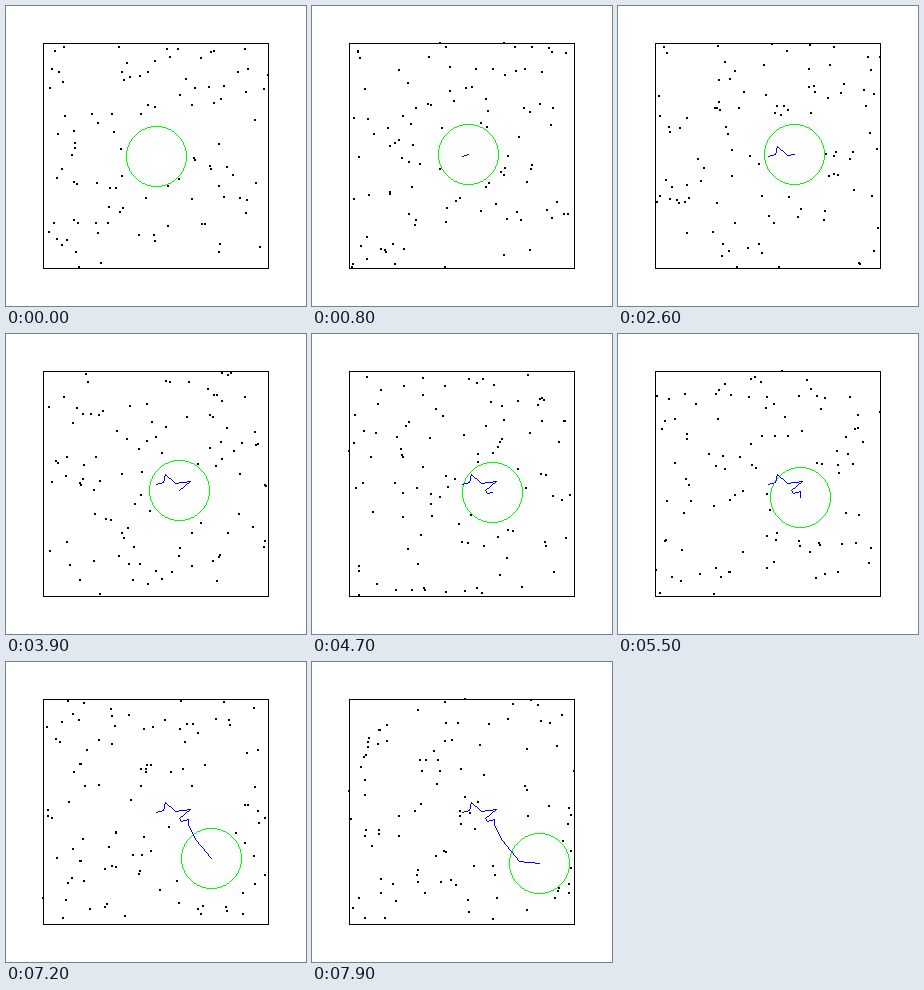
These frames come from a looping animation (300 px wide and 300 px high, 8000 ms). A matplotlib script:

```python
import numpy as np
import matplotlib.pyplot as plt
from matplotlib.animation import FuncAnimation

SIZE, FRAMES, STEP_MS = 300, 80, 100
LOW, HIGH = 37, 262
RADIUS, COUNT, SPEED, SUBSTEPS = 30, 100, 4.0, 4
BLACK, GREEN, BLUE, WHITE = (0, 0, 0), (0, 255, 0), (0, 0, 255), 255

# Turning points of the big disc's random walk: step, x, y
TURNS = np.array([
    (0, 150, 150), (9, 157, 148), (14, 159, 140), (22, 169, 149),
    (30, 184, 147), (39, 173, 156), (42, 175, 159), (49, 182, 157),
    (55, 182, 163), (65, 190, 178), (73, 207, 199), (79, 227, 201),
])


def disc_at(t):
    steps, xs, ys = TURNS.T
    return np.array([np.interp(t, steps, xs), np.interp(t, steps, ys)])


def simulate():
    """Gas of point particles bouncing off the walls and the moving disc."""
    rng = np.random.default_rng(11)
    pos = rng.uniform(LOW, HIGH, (4 * COUNT, 2))
    outside = np.hypot(*(pos - disc_at(0)).T) > RADIUS + 2
    pos = pos[outside][:COUNT]
    angle = rng.uniform(0, 2 * np.pi, COUNT)
    vel = SPEED * np.column_stack([np.cos(angle), np.sin(angle)])

    states, dt = [pos.copy()], 1 / SUBSTEPS
    for i in range(1, (FRAMES - 1) * SUBSTEPS + 1):
        center = disc_at(i * dt)
        drift = (center - disc_at((i - 1) * dt)) / dt
        pos = pos + vel * dt

        vel = np.where(pos < LOW, np.abs(vel), vel)
        vel = np.where(pos > HIGH, -np.abs(vel), vel)
        pos = np.where(pos < LOW, 2 * LOW - pos, pos)
        pos = np.where(pos > HIGH, 2 * HIGH - pos, pos)

        gap = pos - center
        dist = np.hypot(gap[:, 0], gap[:, 1])
        hit = dist < RADIUS + 1
        normal = gap[hit] / dist[hit, None]
        inward = np.minimum(((vel[hit] - drift) * normal).sum(axis=1), 0)
        vel[hit] -= 2 * inward[:, None] * normal
        pos[hit] = center + (RADIUS + 1) * normal

        if i % SUBSTEPS == 0:
            states.append(pos.copy())
    return states


def plot(img, x, y, color):
    img[np.rint(y).astype(int), np.rint(x).astype(int)] = color


def line(img, a, b, color):
    a, b = np.rint(a), np.rint(b)
    n = int(np.abs(b - a).max()) + 1
    plot(img, np.linspace(a[0], b[0], n), np.linspace(a[1], b[1], n), color)


def circle(img, center, r, color):
    cx, cy = np.rint(center)
    reach = int(r / np.sqrt(2))
    u = np.arange(-reach, reach + 1)
    v = np.rint(np.sqrt(r * r - u * u))
    for side in (-1, 1):
        plot(img, cx + u, cy + side * v, color)
        plot(img, cx + side * v, cy + u, color)


def box(img, low, high, color):
    corners = np.array([(low, low), (high, low), (high, high), (low, high)])
    for a, b in zip(corners, np.roll(corners, -1, axis=0)):
        line(img, a, b, color)


def render(i):
    img = np.full((SIZE, SIZE, 3), WHITE, dtype=np.uint8)
    box(img, LOW, HIGH, BLACK)
    x, y = np.rint(STATES[i]).T
    for dx in (-1, 0):
        for dy in (-1, 0):
            plot(img, x + dx, y + dy, BLACK)

    center = disc_at(i)
    circle(img, center, RADIUS, GREEN)
    if i > 0:
        path = np.vstack([TURNS[TURNS[:, 0] < i, 1:], center])
        for a, b in zip(path, path[1:]):
            line(img, a, b, BLUE)
    return img


STATES = simulate()

fig = plt.figure(figsize=(3, 3), dpi=100, facecolor="white")
ax = fig.add_axes([0, 0, 1, 1])
ax.axis("off")
stage = ax.imshow(render(0), interpolation="nearest", aspect="auto")


def update(i):
    stage.set_data(render(i))
    return stage,


anim = FuncAnimation(fig, update, frames=FRAMES, interval=STEP_MS,
                     repeat=True, repeat_delay=0)
plt.show()
```
